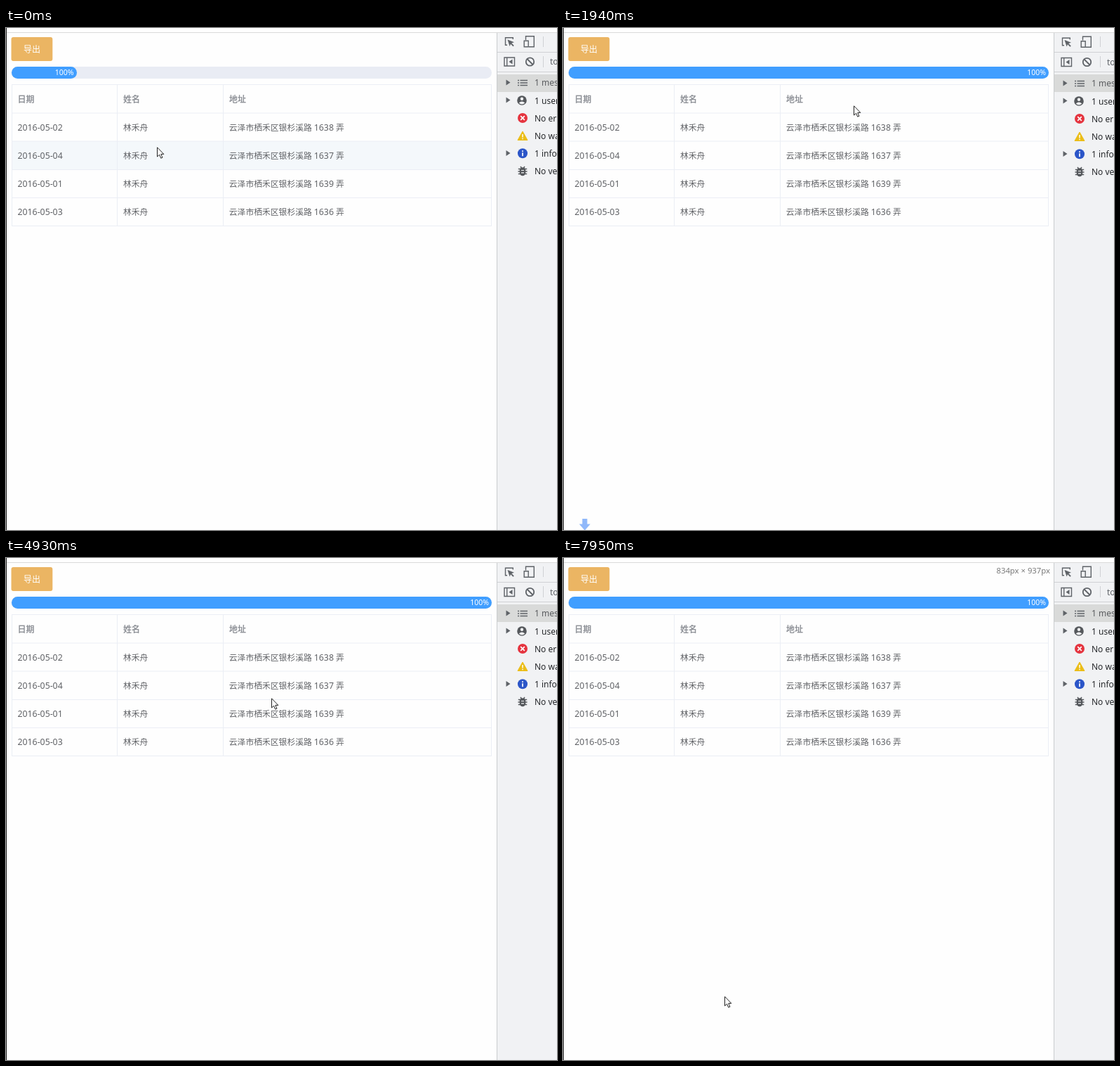
An HTML page that plays this animation: 785 px wide and 714 px high, repeating every 8 s.

```html
<!DOCTYPE html>
<html lang="zh-CN">
<head>
<meta charset="utf-8">
<title>导出</title>
<style>
html, body { margin: 0; width: 100%; height: 100%; overflow: hidden; background: #fff; }
body { position: relative; }
svg { position: absolute; left: 0; top: 0; overflow: hidden; }
text, .fill { font-family: "Noto Sans", "Open Sans", "Noto Sans CJK SC", sans-serif; }
.cjk { font-family: "Noto Sans CJK SC", "Noto Sans CJK JP", sans-serif; }
.cell { font-size: 12.3px; fill: #606266; }
.cell .cjk { font-size: 11.8px; }
.head { font-size: 12px; font-weight: 700; fill: #909399; }
.tools text { font-size: 12px; fill: #26282b; }
.size { font-size: 11.3px; fill: #7a7a7a; text-anchor: end; }
.fill {
  position: absolute; left: 7.5px; top: 55px; width: 684.5px; height: 17px;
  box-sizing: border-box; padding-right: 4px; border-radius: 9px;
  background: #409eff; color: #fff; font-size: 10.5px; line-height: 17px; text-align: right;
}

/* one 8 s clock for everything */
.anim { animation: 8s linear infinite; }
.fill { animation-name: grow; }
.cursor { animation-name: move; }
.arrow { animation-name: arrow; animation-timing-function: step-end; }
.beam { animation-name: beam; animation-timing-function: step-end; }
.drop { animation-name: drop; }
.small { animation-name: small; animation-timing-function: step-end; }
.tall { animation-name: tall; animation-timing-function: step-end; }
.row2 { animation-name: row2; }
.row3 { animation-name: row3; }
.row4 { animation-name: row4; }
.bar { animation-name: halfpx; animation-timing-function: step-end; }
.list { animation-name: onepx; animation-timing-function: step-end; }

@keyframes grow {
  0%, .3% { width: 93px; animation-timing-function: cubic-bezier(.174, .328, .312, 1); }
  7.35%, 100% { width: 684.5px; }
}
@keyframes move {
  0%, .375% { transform: translate(215px, 169px); }
  3.75%, 4.1% { transform: translate(218.5px, 170.5px); animation-timing-function: ease-out; }
  7%, 12.375% { transform: translate(252px, 178px); animation-timing-function: ease-in-out; }
  13.875%, 17% { transform: translate(287px, 178px); animation-timing-function: ease-in-out; }
  24%, 27.25% { transform: translate(414px, 110px); animation-timing-function: ease-in-out; }
  30.5%, 33% { transform: translate(341px, 519px); animation-timing-function: ease-in; }
  37.375%, 38% { transform: translate(410px, 49px); }
  38.8% { transform: translate(412px, -20px); animation-timing-function: step-end; }
  49.8% { transform: translate(454px, -20px); animation-timing-function: ease-in-out; }
  53.5% { transform: translate(310px, 654px); animation-timing-function: ease-in-out; }
  56.5% { transform: translate(214px, 540px); animation-timing-function: ease-out; }
  59.75%, 60.1% { transform: translate(230px, 479px); animation-timing-function: ease-in-out; }
  61.6%, 62% { transform: translate(378px, 199px); animation-timing-function: ease-in-out; }
  65.5% { transform: translate(602px, 290px); animation-timing-function: ease-in-out; }
  70%, 70.375% { transform: translate(394px, 254px); }
  71.5%, 74.25% { transform: translate(418px, 247px); }
  76.375%, 84.125% { transform: translate(434px, 265px); animation-timing-function: ease-in-out; }
  93.5%, 94.5% { transform: translate(432px, 364px); animation-timing-function: ease-in-out; }
  99.3%, 100% { transform: translate(230px, 623px); }
}
@keyframes arrow { 0% { opacity: 1; } 70% { opacity: 0; } 87% { opacity: 1; } 100% { opacity: 1; } }
@keyframes beam { 0% { opacity: 0; } 70% { opacity: 1; } 87% { opacity: 0; } 100% { opacity: 0; } }
@keyframes drop {
  0%, 18.5% { transform: translate(23px, 680px); opacity: 0; }
  22.25% { transform: translate(23px, 692px); opacity: 1; }
  24.25% { transform: translate(23px, 698px); opacity: .7; }
  26%, 100% { transform: translate(23px, 704px); opacity: 0; }
}
@keyframes small { 0% { opacity: 0; } 35.5% { opacity: 1; } 41% { opacity: 0; } 100% { opacity: 0; } }
@keyframes tall { 0% { opacity: 0; } 91.5% { opacity: 1; } 100% { opacity: 1; } }
@keyframes row2 {
  0%, .375% { fill: #f4f8fb; }
  3%, 19% { fill: #f5f6fa; }
  22%, 100% { fill: #fefefe; }
}
@keyframes row3 {
  0%, 68% { fill: #fefefe; }
  70%, 84.2% { fill: #f8f9fc; }
  86.5%, 100% { fill: #fefefe; }
}
@keyframes row4 {
  0%, 74.25% { fill: #fefefe; }
  76.3%, 85% { fill: #f8f9fc; }
  87.5%, 100% { fill: #fefefe; }
}
@keyframes halfpx { 0% { transform: none; } 20% { transform: translateY(.5px); } 100% { transform: translateY(.5px); } }
@keyframes onepx { 0% { transform: none; } 20% { transform: translateY(1px); } 100% { transform: translateY(1px); } }
</style>
</head>
<body>
<svg width="785" height="714" viewBox="0 0 785 714">
  <rect width="785" height="714" fill="#fefefe"/>
  <rect y="6" width="785" height="1" fill="#dadada"/>
  <rect width="1" height="714" fill="#222"/>

  <rect x="7.5" y="13" width="58.8" height="34" rx="3" fill="#ebb563"/>
  <text class="cjk" x="25" y="34.5" font-size="12" font-weight="500" fill="#fff">导出</text>
  <rect x="7.5" y="55" width="684.5" height="17" rx="8.5" fill="#e9ecf4"/>

  <rect class="anim row2" x="8" y="161" width="684" height="40" fill="#fefefe"/>
  <rect class="anim row3" x="8" y="201" width="684" height="40" fill="#fefefe"/>
  <rect class="anim row4" x="8" y="241" width="684" height="40" fill="#fefefe"/>
  <path d="M8 80.5H692M8 121H692M8 161H692M8 201.5H692M8 241.5H692M8 281.5H692M8.5 80V282M158.5 80V282M309.5 80V282M691.5 80V282" fill="none" stroke="#ebeef5"/>
  <g class="head">
    <text class="cjk" x="16.5" y="105.5">日期</text>
    <text class="cjk" x="167" y="105.5">姓名</text>
    <text class="cjk" x="318" y="105.5">地址</text>
  </g>
  <g id="rows" class="cell"></g>

  <text class="size anim small" x="694" y="22" opacity="0">834px × 881px</text>
  <text class="size anim tall" x="694" y="22" opacity="0">834px × 937px</text>

  <g class="tools">
    <rect x="699" y="7" width="86" height="707" fill="#f1f2f4"/>
    <rect x="699" y="7" width="1" height="707" fill="#c9cbce"/>
    <rect x="700" y="66" width="85" height="25" fill="#d9dad9"/>
    <path d="M700 34.5H785M700 62.5H785M765.5 12V27M765.5 40V56" stroke="#cfd1d4"/>
    <g class="anim bar" fill="none" stroke="#5f6368" stroke-width="1.4">
      <path d="M714 24.3H711.5V13.7H722.3V16"/>
      <path d="M714.5 16.5L724 20.2L720.3 21.4L723.8 25L722.4 26.3L719 22.7L717.6 26Z" fill="#5f6368" stroke="none"/>
      <path d="M740.5 17V11.8H752.3V26.7H745M738.2 18.2H744.2V26.7H738.2Z"/>
      <path d="M710 42H724.5V54H710ZM713.7 42V54"/>
      <path d="M721.5 44.5V51.5L716.5 48Z" fill="#5f6368" stroke="none"/>
      <circle cx="746.5" cy="48" r="5.7" stroke-width="1.8"/>
      <path d="M742.5 44L750.5 52" stroke-width="1.8"/>
      <text x="775" y="52.3" stroke="none" style="fill:#5f6368">top</text>
    </g>
    <g class="anim list">
      <path d="M712.5 73.5V81.5L718.5 77.5ZM712.5 98.5V106.5L718.5 102.5ZM712.5 174V182L718.5 178Z" fill="#5f6368"/>
      <path d="M729 74.5H731M732.5 74.5H743M729 78H731M732.5 78H743M729 81.5H731M732.5 81.5H743" stroke="#5f6368" stroke-width="1.6"/>
      <circle cx="735" cy="103" r="6.8" fill="#55585c"/>
      <circle cx="735" cy="100.8" r="2.2" fill="#f1f2f4"/>
      <path d="M730.7 106.6Q735 102.2 739.3 106.6Q735 110.6 730.7 106.6Z" fill="#f1f2f4"/>
      <circle cx="736" cy="128" r="7" fill="#e5343f"/>
      <path d="M733.2 125.2L738.8 130.8M738.8 125.2L733.2 130.8" stroke="#fff" stroke-width="1.7"/>
      <path d="M736 147L743 159.5H729Z" fill="#ebbd17" stroke="#ebbd17" stroke-linejoin="round"/>
      <path d="M736 151V155.5M736 156.7V158.3" stroke="#fff" stroke-width="1.5"/>
      <circle cx="736" cy="178.3" r="7" fill="#2b55c8"/>
      <path d="M736 174.3V176M736 177.3V182.3" stroke="#fff" stroke-width="1.7"/>
      <path d="M733 197L734.5 199M739 197L737.5 199M729.8 200.5H742.2M729.5 204H742.5M729.8 207.5H742.2" stroke="#55585c" stroke-width="1.5"/>
      <rect x="731.8" y="198.2" width="8.4" height="12" rx="4.2" fill="#55585c"/>
      <path d="M734 202.5H738M734 205.8H738" stroke="#f1f2f4" stroke-width="1.2"/>
      <text x="753" y="82.3" style="fill:#5a5c5f">1 message</text>
      <text x="753" y="107.5">1 user message</text>
      <text x="753" y="132.5">No errors</text>
      <text x="753" y="157.5">No warnings</text>
      <text x="753" y="182.7">1 info</text>
      <text x="753" y="207.8">No verbose</text>
    </g>
  </g>

  <path class="anim drop" d="M4.5 0H11.5V7.5H16L8 16.5L0 7.5H4.5Z" fill="#5f99f8" opacity="0"/>
</svg>

<div class="fill anim">100%</div>

<svg width="785" height="714" viewBox="0 0 785 714">
  <g class="anim cursor">
    <path class="anim arrow" d="M.5 .8V14L3.6 11.2L5.7 16.2L7.9 15.3L5.8 10.4H9.8Z" fill="#fff" stroke="#222"/>
    <path class="anim beam" d="M-3 -6.5H-1L0 -5.8L1 -6.5H3M0 -6V6M-3 6.5H-1L0 5.8L1 6.5H3" fill="none" stroke="#222" stroke-width="1.1" opacity="0"/>
  </g>
</svg>

<script>
const data = [["02", 1638], ["04", 1637], ["01", 1639], ["03", 1636]];
document.getElementById("rows").innerHTML = data.map(([day, lane], i) => {
  const y = 145.7 + i * 40.15;
  const put = (x, str, cls = "") => `<text class="${cls}" x="${x}" y="${y}">${str}</text>`;
  return put(16.5, "2016-05-" + day) +
    put(167, "林禾舟", "cjk") +
    put(317.8, "云泽市栖禾区银杉溪路", "cjk") +
    put(438.8, lane) +
    put(470, "弄", "cjk");
}).join("");
</script>
</body>
</html>
```
